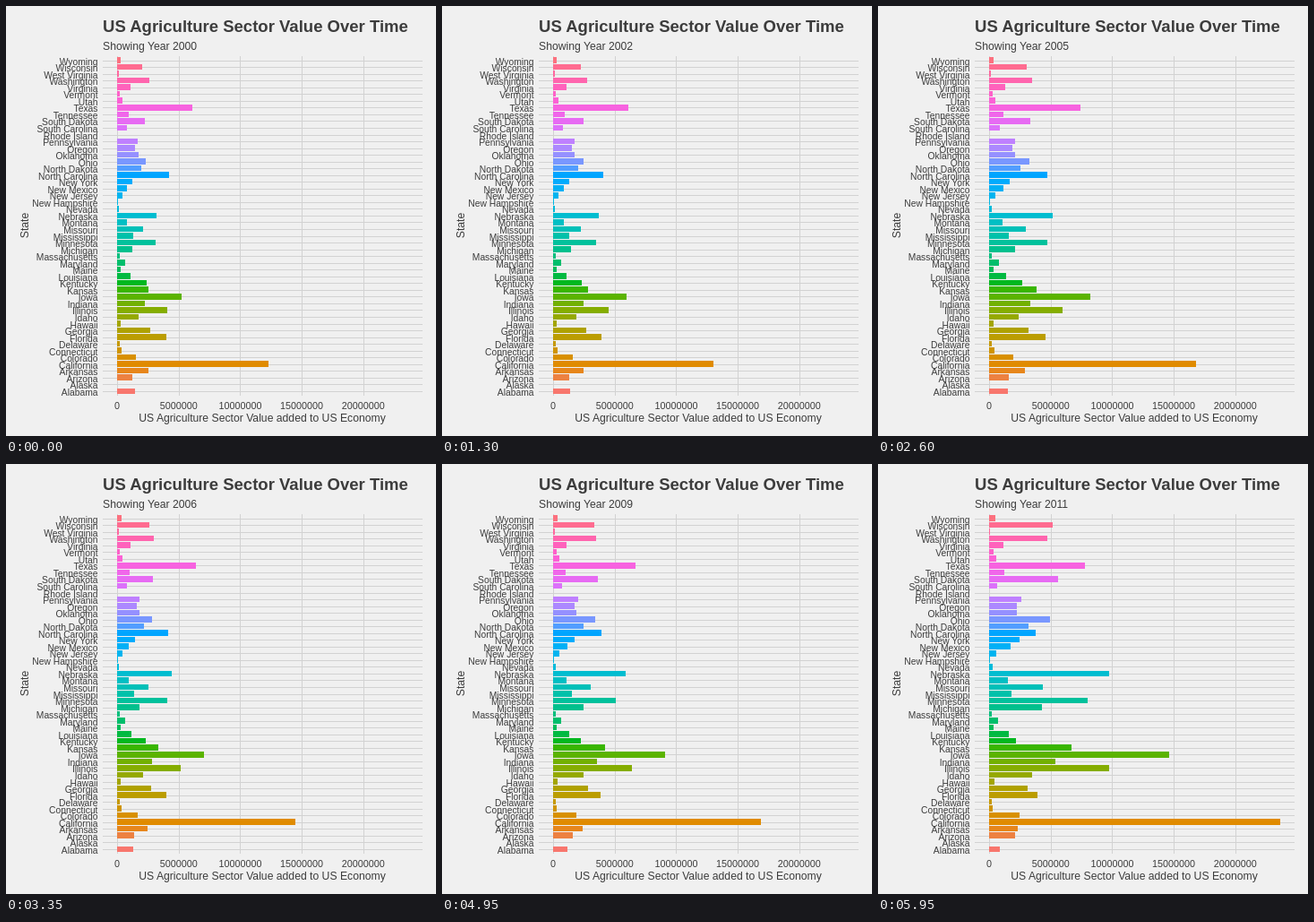
Recreate the animation shown at these times as an HTML page. Size 480 px wide and 480 px high, loop 6000 ms.

```html
<!DOCTYPE html>
<html lang="en">
<head>
<meta charset="utf-8">
<title>US Agriculture Sector Value Over Time</title>
<style>
  html, body { margin: 0; width: 100%; height: 100%; overflow: hidden; background: #f0f0f0; }
  svg { display: block; width: 480px; height: 480px; font-family: "Liberation Sans", Arial, sans-serif; }
  text { fill: #3c3c3c; font-size: 12.2px; }
  .title { font-size: 18.55px; font-weight: bold; }
  .state { font-size: 10.3px; text-anchor: end; }
  .tick { font-size: 10.8px; text-anchor: middle; }
  .axis { text-anchor: middle; }
  .grid { fill: #d2d2d2; }
  rect { shape-rendering: crispEdges; }
</style>
</head>
<body>
<svg viewBox="0 0 480 480">
  <rect width="480" height="480" fill="#f0f0f0"/>
  <text class="title" x="108" y="29">US Agriculture Sector Value Over Time</text>
  <text id="year" x="108" y="49">Showing Year 2000</text>
  <g id="grid"></g>
  <g id="bars"></g>
  <g id="labels"></g>
  <text class="axis" x="286" y="464">US Agriculture Sector Value added to US Economy</text>
  <text class="axis" transform="translate(25 245) rotate(-90)">State</text>
</svg>
<script>
const LOOP = 6000, STEP = 50, STEPS = LOOP / STEP, YEARS = 11;
const ZERO = 124, TICK = 68.7, ROW = 7.5375, BOTTOM = 429.93;

// State, then bar length in px in the first and last year, from the bottom up
const STATES = `Alabama 20 12, Alaska 0 0, Arizona 17 29, Arkansas 35 32, California 169 325,
  Colorado 21 34, Connecticut 5 4, Delaware 3 3, Florida 55 54, Georgia 37 43, Hawaii 4 6,
  Idaho 24 48, Illinois 56 134, Indiana 31 74, Iowa 72 201, Kansas 35 92, Kentucky 33 30,
  Louisiana 15 22, Maine 4 5, Maryland 9 10, Massachusetts 3 3, Michigan 17 59,
  Minnesota 43 110, Mississippi 18 25, Missouri 29 60, Montana 11 21, Nebraska 44 134,
  Nevada 2 4, New Hampshire 1 1, New Jersey 6 8, New Mexico 11 24, New York 17 34,
  North Carolina 58 52, North Dakota 27 44, Ohio 32 68, Oklahoma 24 31, Oregon 20 31,
  Pennsylvania 23 36, Rhode Island 0 0, South Carolina 11 9, South Dakota 31 77,
  Tennessee 13 17, Texas 84 107, Utah 6 8, Vermont 3 5, Virginia 15 16, Washington 36 65,
  West Virginia 2 1, Wisconsin 28 71, Wyoming 4 7`.split(/,\s+/);

// Shared by all states, one value per year: share of the growth done, and the market's swing
const GROWTH = [0, 0, 0.05, 0.14, 0.2, 0.2, 0.15, 0.36, 0.45, 0.4, 0.62, 1];
const SWING = [1, 1.02, 0.95, 1.03, 1.2, 1.14, 0.98, 1.08, 1.01, 0.98, 0.97, 1];

const byId = id => document.getElementById(id);

function add(parent, tag, attrs, content = '') {
  const el = document.createElementNS('http://www.w3.org/2000/svg', tag);
  for (const key in attrs) el.setAttribute(key, attrs[key]);
  el.textContent = content;
  return byId(parent).appendChild(el);
}

// Evenly spaced hue at luminance 65, chroma 100 (polar LUV to sRGB)
function hue(i) {
  const a = (15 + 360 * i / STATES.length) * Math.PI / 180, L = 65;
  const Y = ((L + 16) / 116) ** 3;
  const u = 100 * Math.cos(a) / (13 * L) + 0.19784;
  const v = 100 * Math.sin(a) / (13 * L) + 0.46834;
  const X = 9 * Y * u / (4 * v), Z = 3 * Y / v - X / 3 - 5 * Y;
  const gamma = c => c > 0.00304 ? 1.055 * c ** (1 / 2.4) - 0.055 : 12.92 * c;
  const rgb = [
    3.24048 * X - 1.53715 * Y - 0.498536 * Z,
    -0.969255 * X + 1.87599 * Y + 0.041556 * Z,
    0.055647 * X - 0.204041 * Y + 1.05731 * Z
  ].map(c => Math.round(255 * Math.min(1, Math.max(0, gamma(c)))));
  return `rgb(${rgb})`;
}

// Linear between the yearly values
function at(curve, year) {
  const i = Math.min(Math.floor(year), YEARS - 1);
  return curve[i] + (curve[i + 1] - curve[i]) * (year - i);
}

for (let k = 0; k < 5; k++) {
  const x = ZERO + TICK * k;
  add('grid', 'rect', { class: 'grid', x: Math.round(x), y: 56, width: 1, height: 379 });
  add('labels', 'text', { class: 'tick', x, y: 449.5 }, k * 5000000);
}

const bars = STATES.map((row, i) => {
  const [, name, from, to] = row.match(/(.+) (\d+) (\d+)$/);
  const y = BOTTOM - ROW * i, mid = Math.round(y);
  const top = Math.round(y - 0.45 * ROW), end = Math.round(y + 0.42 * ROW);
  add('grid', 'rect', { class: 'grid', x: 108, y: mid, width: 357, height: 1 });
  add('labels', 'text', { class: 'state', x: 102.5, y: mid + 5 }, name);
  const el = add('bars', 'rect', { x: ZERO, y: top, height: end - top, fill: hue(i) });
  return { el, from: +from, to: +to };
});

function draw(now) {
  const step = Math.floor(now % LOOP / STEP);
  const year = YEARS * step / (STEPS - 1);
  const growth = at(GROWTH, year), swing = at(SWING, year);
  byId('year').textContent = 'Showing Year ' + Math.round(2000 + year);
  for (const { el, from, to } of bars) {
    el.setAttribute('width', Math.round((from + (to - from) * growth) * swing));
  }
}

const start = performance.now();
function tick() {
  draw(performance.now() - start);
  requestAnimationFrame(tick);
}
tick();
</script>
</body>
</html>
```
